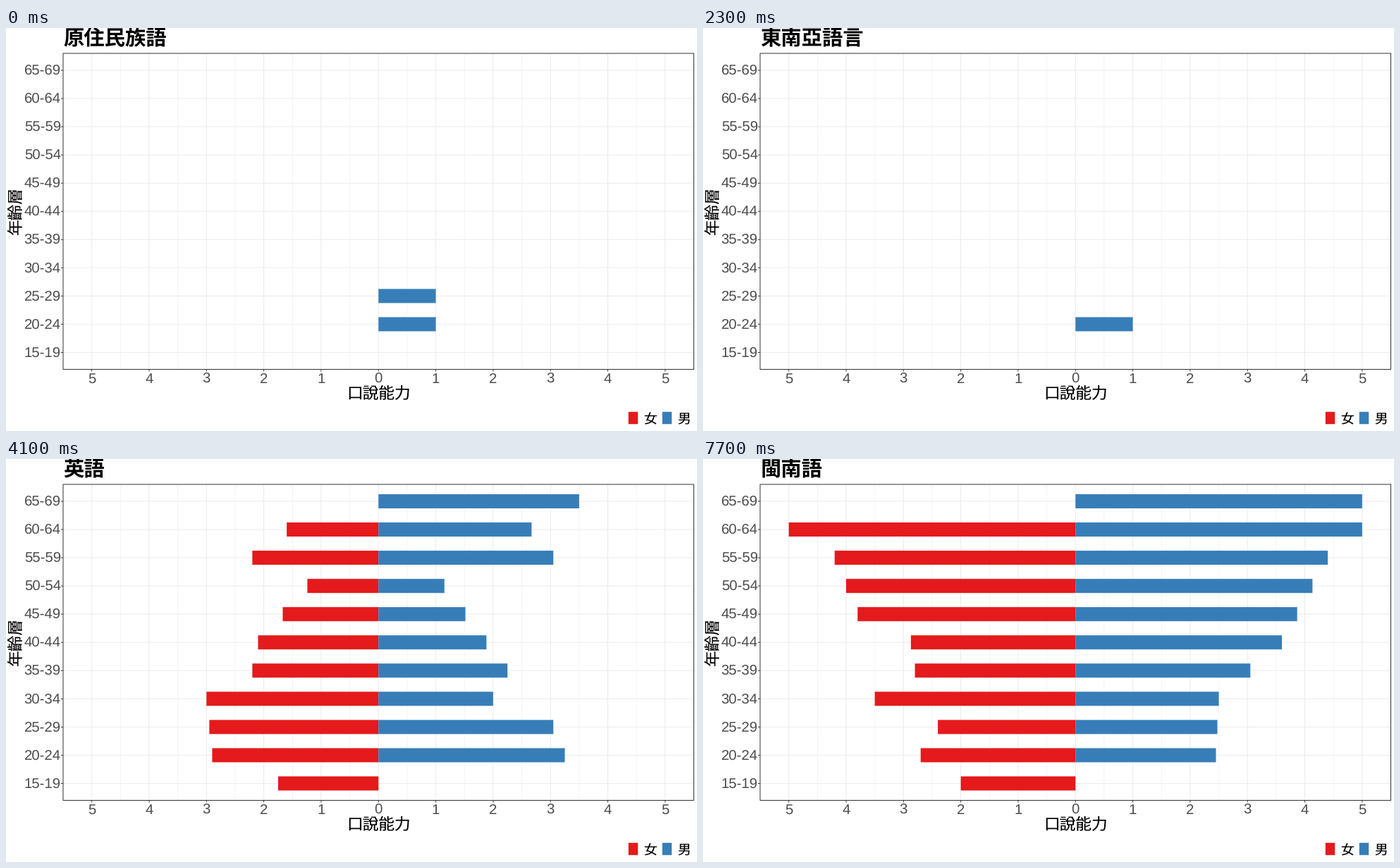
Animation of 980 by 572 pixels, one loop 8000 ms. Source, as a matplotlib script:

```python
import matplotlib.pyplot as plt
import numpy as np
from matplotlib.animation import FuncAnimation
from matplotlib.patches import Rectangle

W, H, DPI = 980, 572, 100
FRAME_MS, FRAMES = 100, 80
HOLD_MS, ELAPSED_MS = 1800, 1300  # time per slide, part of the first already gone
LEFT, TOP, RIGHT, BOTTOM = 81, 36, 975.5, 484.5
ZERO, UNIT = (LEFT + RIGHT) / 2, (RIGHT - LEFT) / 11
STEP = (BOTTOM - TOP) / 11.2
RED, BLUE, GRID, DARK, GREY = "#e41a1c", "#377eb8", "#ebebeb", "#333333", "#4d4d4d"
LATIN, CJK = "Liberation Sans", "Noto Sans CJK JP"
ROWS = np.arange(11)


def curve(*points):
    """Score per age row, linear between (row, score) points, zero outside."""
    rows, scores = zip(*points)
    return np.interp(ROWS, rows, scores, left=0, right=0)


def fluent():
    """Close to five everywhere, with shallow waves that deepen with age."""
    waves = 5 - 0.27 * np.sin(np.pi * ROWS / 3) ** 2 * np.minimum(1, ROWS / 4)
    return np.minimum(waves, 4.5 + ROWS / 2) * (ROWS < 10)


# title, women, men
SLIDES = [
    ("原住民族語", 0 * ROWS, curve((1, 1), (2, 1))),
    ("客家語",
     curve((0, 1.5), (1, .86), (2, .5), (3, .5), (4, 3), (5, .5), (6, 0),
           (7, 2.5), (8, 1), (9, 3)),
     curve((1, 1.9), (2, .5), (3, 0), (4, 1.6), (5, 0), (6, 0), (7, 1.25),
           (9, 4), (10, 1))),
    ("東南亞語言", 0 * ROWS, curve((1, 1))),
    ("英語",
     curve((0, 1.75), (1, 2.9), (3, 3), (4, 2.2), (5, 2.1), (7, 1.24),
           (8, 2.2), (9, 1.6)),
     curve((1, 3.25), (2, 3.05), (3, 2), (4, 2.25), (7, 1.15), (8, 3.05),
           (9, 2.67), (10, 3.5))),
    ("華語", fluent(),
     curve((1, 4.86), (2, 5), (3, 4), (4, 4.86), (6, 5), (10, 5))),
    ("閩南語",
     curve((0, 2), (1, 2.7), (2, 2.4), (3, 3.5), (4, 2.8), (5, 2.87),
           (6, 3.8), (8, 4.2), (9, 5)),
     curve((1, 2.45), (3, 2.5), (5, 3.6), (8, 4.4), (9, 5), (10, 5))),
]

plt.rcParams["text.hinting"] = "none"
fig = plt.figure(figsize=(W / DPI, H / DPI), dpi=DPI, facecolor="white")
ax = fig.add_axes([0, 0, 1, 1])
ax.set(xlim=(0, W), ylim=(H, 0))
ax.axis("off")


def pt(px):
    return px * 72 / DPI


def x_at(score):
    return ZERO + score * UNIT


def y_at(row):
    return BOTTOM - (row + 0.6) * STEP


def line(x0, y0, x1, y1, color, width=1.0):
    ax.plot([x0, x1], [y0, y1], color=color, lw=pt(width), zorder=1,
            solid_capstyle="butt", snap=False)


def label(x, y, text, px, font=CJK, color="black", **kw):
    return ax.text(x, y, text, fontsize=pt(px), family=font, color=color,
                   va="baseline", **kw)


def box(x, y, w, h, color):
    return ax.add_patch(Rectangle((x, y), w, h, fc=color, lw=0, zorder=3,
                                  snap=False))


# grid, ticks and tick labels
for score in np.arange(-4.5, 5):
    line(x_at(score), TOP, x_at(score), BOTTOM, GRID, 0.5)
for score in range(-5, 6):
    x = x_at(score)
    line(x, TOP, x, BOTTOM, GRID)
    line(x, BOTTOM, x, BOTTOM + 3, DARK)
    label(x, 504, str(abs(score)), 20.4, LATIN, GREY, ha="center")
for row in ROWS:
    y, age = y_at(row), 15 + 5 * row
    line(LEFT, y, RIGHT, y, GRID)
    line(LEFT - 3, y, LEFT, y, DARK)
    label(77.8, y + 7, f"{age}-{age + 4}", 20.4, LATIN, GREY, ha="right")

ax.add_patch(Rectangle((LEFT, TOP), RIGHT - LEFT, BOTTOM - TOP, fill=False,
                       ec=DARK, lw=pt(1), zorder=4, snap=False))

# titles and legend
title = label(81.5, 24.7, "", 29.33, weight="bold")
label(ZERO, 526, "口說能力", 22.67, ha="center")
label(20, 259.6, "年齡層", 22.67, ha="center", rotation=90,
      rotation_mode="anchor")
for x, color, text in ((882.8, RED, "女"), (930.8, BLUE, "男")):
    box(x, 544.8, 13.4, 17.4, color)
    label(x + 21.5, 561.6, text, 18.67)

women, men = ([box(ZERO, y_at(row) - STEP / 4, 0, STEP / 2, color)
               for row in ROWS] for color in (RED, BLUE))


def update(frame):
    slide = (frame * FRAME_MS + ELAPSED_MS) // HOLD_MS
    name, left, right = SLIDES[slide]
    title.set_text(name)
    for bars, scores in ((women, -left), (men, right)):
        for bar, score in zip(bars, scores):
            bar.set_width(score * UNIT)
            bar.set_visible(score != 0)
    return [title, *women, *men]


anim = FuncAnimation(fig, update, frames=FRAMES, interval=FRAME_MS,
                     init_func=lambda: update(0), repeat=True, repeat_delay=0)
plt.show()
```
